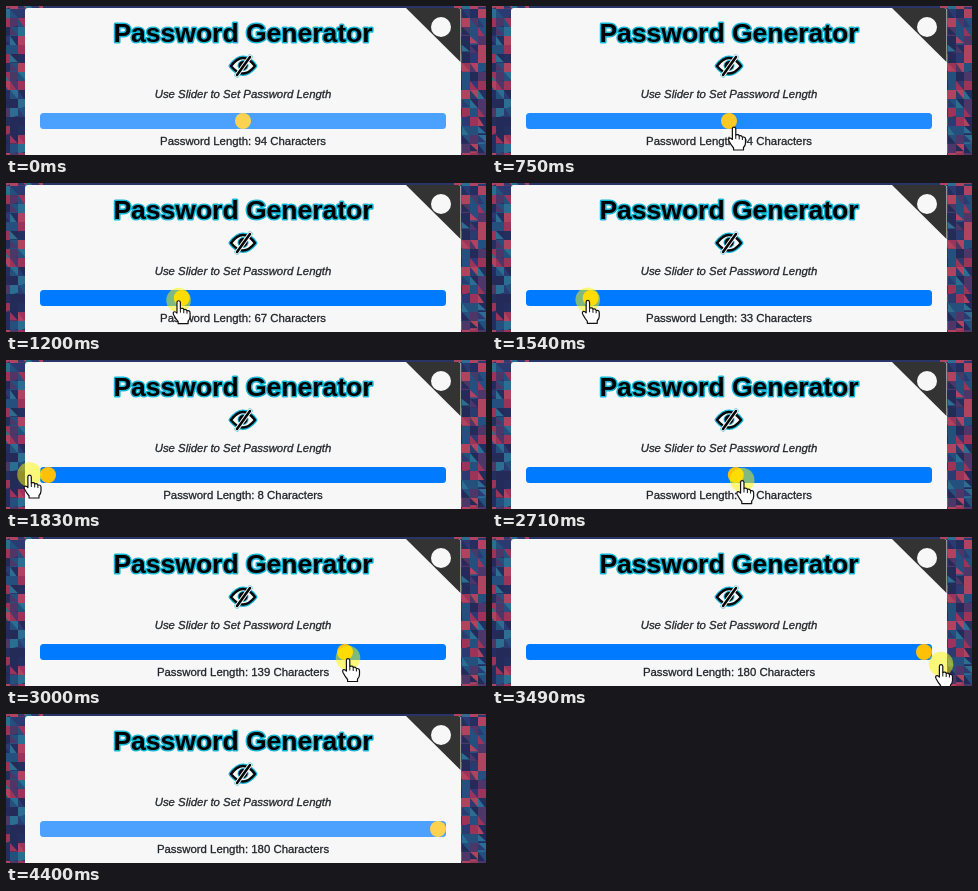
An HTML page with a canvas for the animation above (5160 ms loop, 480 by 149 pixels).

```html
<!DOCTYPE html>
<html lang="en">
<head>
<meta charset="utf-8">
<title>Password Generator</title>
<style>
  html, body { margin: 0; width: 100%; height: 100%; overflow: hidden; }
  canvas { display: block; }
</style>
</head>
<body>
<canvas id="stage" width="480" height="149"></canvas>
<script>
const LOOP = 5160;
const FONT = '"Liberation Sans", Arial, sans-serif';
const CARD = '#f7f7f7', CYAN = '#16b5d4';
const MIN = 8, MAX = 180, TRACK_LEFT = 42, TRACK_SPAN = 390;
const PRESS = 965, RELEASE = 4085, LAG = 15;

// Pointer path: [time, x, y]
const path = [
  [215, 262, 150], [400, 254, 137], [670, 244, 123], [750, 242, 120.5],
  [950, 237, 118], [1250, 160, 117], [1540, 96, 116.8], [1830, 23.5, 114.5],
  [2310, 23.5, 114.5], [2420, 121, 119], [2830, 303, 120.5], [3000, 341.8, 121],
  [3370, 417, 125], [3490, 449, 127], [4085, 449, 127], [4390, 449, 150]
];

const clamp = (v, lo, hi) => Math.min(hi, Math.max(lo, v));

function pointer(t) {
  if (t <= path[0][0]) return path[0].slice(1);
  for (let i = 1; i < path.length; i++) {
    const [t0, x0, y0] = path[i - 1], [t1, x1, y1] = path[i];
    if (t < t1) {
      const k = (t - t0) / (t1 - t0);
      return [x0 + (x1 - x0) * k, y0 + (y1 - y0) * k];
    }
  }
  return path[path.length - 1].slice(1);
}

function lengthAt(t) {
  if (t < PRESS) return 94;
  const x = pointer(Math.min(t, RELEASE) - LAG)[0];
  return Math.round(clamp(MIN + (x - TRACK_LEFT) * (MAX - MIN) / TRACK_SPAN, MIN, MAX));
}

// The slider is 70% opaque until hovered
function sliderOpacity(t) {
  const on = clamp((t - 670) / 140, 0, 1), off = clamp((t - RELEASE) / 200, 0, 1);
  return 0.7 + 0.3 * (on - off);
}

function shape(c, d, fill, stroke, width) {
  const p = new Path2D(d);
  if (fill) { c.fillStyle = fill; c.fill(p); }
  if (stroke) { c.strokeStyle = stroke; c.lineWidth = width; c.stroke(p); }
}

function disc(c, x, y, r, fill) {
  c.fillStyle = fill;
  c.beginPath();
  c.arc(x, y, r, 0, Math.PI * 2);
  c.fill();
}

function rounded(c, x, y, w, h, r, fill) {
  c.fillStyle = fill;
  c.beginPath();
  c.roundRect(x, y, w, h, r);
  c.fill();
}

function label(c, text, y, font, color, outline, width) {
  c.font = font + ' ' + FONT;
  c.textAlign = 'center';
  c.lineJoin = 'round';
  c.strokeStyle = outline;
  c.lineWidth = width;
  c.strokeText(text, 237, y);
  c.fillStyle = color;
  c.fillText(text, 237, y);
}

function drawMosaic(c) {
  const colors = ['#232f5e', '#2c3a72', '#9c3459', '#b0435f', '#2c6d92', '#4d3768', '#25507d', '#252b58'];
  let seed = 11;
  const random = () => (seed = (seed * 16807) % 2147483647) / 2147483647;
  const color = () => colors[Math.floor(random() * colors.length)];
  for (const left of [0, 452]) {
    for (let y = -6; y < 149; y += 9) {
      for (let x = left - 4; x < left + 30; x += 8) {
        const skew = random() * 6 - 3;
        shape(c, `M${x} ${y}h9l0 ${10 + skew}l-9 ${-skew}z`, color());
        if (random() < 0.5) shape(c, `M${x} ${y}l8 ${9 + skew}h-8z`, color());
      }
    }
  }
}

function drawEye(c) {
  c.lineCap = c.lineJoin = 'round';
  const eye = 'M225 60Q237 44 249 60Q237 75 225 60Z';
  const iris = 'M237 54.5a5 5 0 1 0 .1 0';
  const slash = 'M244 51L231 69';
  for (const d of [eye, slash]) shape(c, d, null, CYAN, 5);
  shape(c, eye, CARD, '#05080a', 2.4);
  shape(c, iris, '#05080a', CYAN, 1);
  shape(c, slash, null, CARD, 4.5);
  shape(c, slash, null, '#05080a', 2.5);
}

function drawPage(c) {
  c.fillStyle = '#283566';
  c.fillRect(0, 0, 480, 149);
  drawMosaic(c);
  rounded(c, 19, 2, 436, 160, 3, CARD);
  shape(c, 'M400 2H452Q454.5 2 454.5 5V56Z', '#333');
  disc(c, 435, 21, 10, CARD);
  label(c, 'Password Generator', 36, 'bold 26.5px', '#000', CYAN, 3);
  drawEye(c);
  label(c, 'Use Slider to Set Password Length', 92, 'italic 11.4px', '#212529', '#212529', 0.3);
}

function drawHand(c, x, y) {
  c.save();
  c.translate(x, y);
  c.lineJoin = 'round';
  shape(c, 'M-1.6 13V2.2Q-1.6 .6 0 .6T1.8 2.2V8.4Q4.6 7.4 5.2 9.4Q7.6 8.5 8.4 10.6' +
    'Q11.5 10 11.5 13V16.5Q11.5 19 9.5 21V23.5H-.4V21.5Q-3 18.5-5 14.5' +
    'Q-6 12-4.2 11.6Q-3 11.4-1.6 13Z', '#fff', '#111', 1.2);
  shape(c, 'M1.8 8.4V12.5M5.2 9.4V13M8.4 10.6V13.5', null, '#111', 1);
  c.restore();
}

const page = document.createElement('canvas');
page.width = 480;
page.height = 149;
drawPage(page.getContext('2d'));
const ctx = document.getElementById('stage').getContext('2d');

function draw(t) {
  const length = lengthAt(t);
  const thumbX = TRACK_LEFT + (length - MIN) * TRACK_SPAN / (MAX - MIN);
  ctx.drawImage(page, 0, 0);

  rounded(ctx, 34, 107, 406, 16, 3.5, '#007bff');
  disc(ctx, thumbX, 115, 8, '#ffc107');
  ctx.globalAlpha = 1 - sliderOpacity(t);
  ctx.fillStyle = CARD;
  ctx.fillRect(34, 107, 406, 16);
  ctx.globalAlpha = 1;
  label(ctx, `Password Length: ${length} Characters`, 139, '11.4px', '#212529', '#212529', 0.3);

  const [x, y] = pointer(t);
  if (t >= PRESS - 15 && t < RELEASE) disc(ctx, x, y, 12.3, 'rgba(255, 248, 0, 0.5)');
  if (y < 149) drawHand(ctx, x, y);
}

const start = performance.now();
function tick() {
  draw((performance.now() - start) % LOOP);
  requestAnimationFrame(tick);
}
tick();
</script>
</body>
</html>
```
